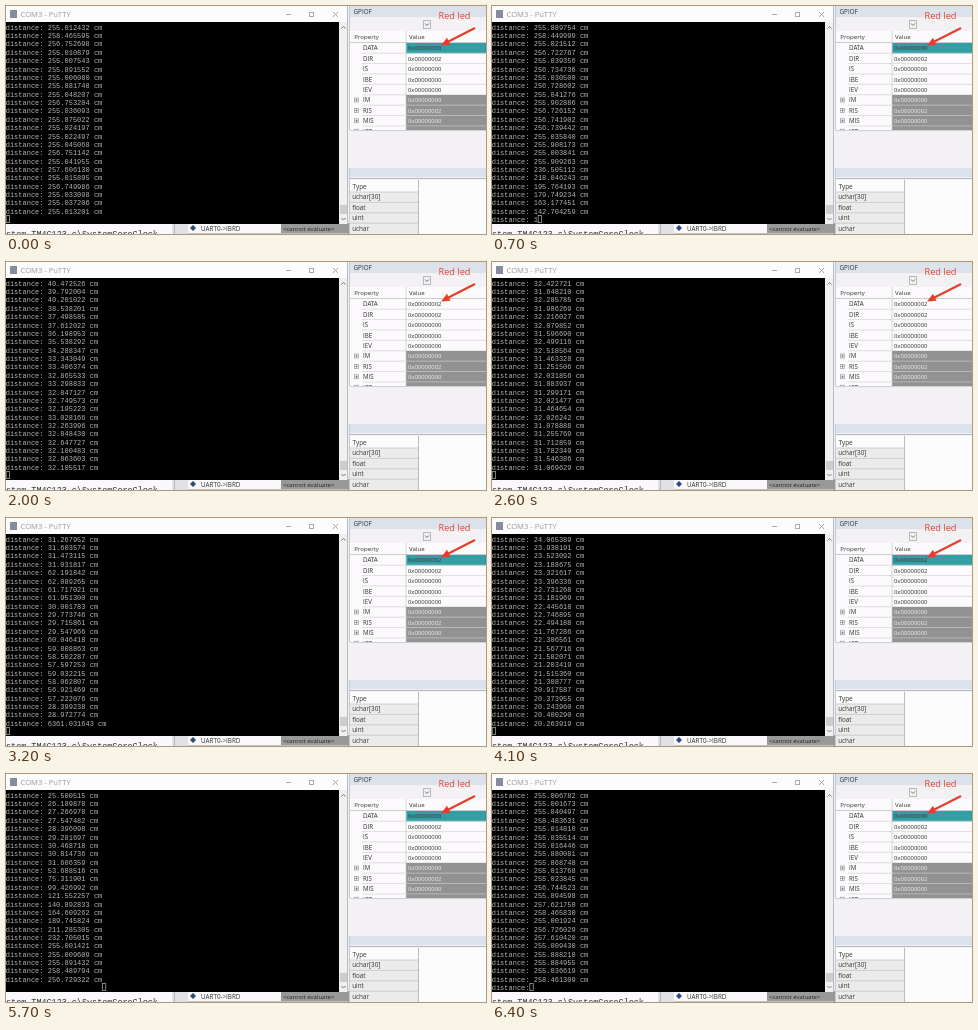
These frames come from a looping animation (480 by 228 pixels, 6.5 s). An HTML page with a canvas:

```html
<!DOCTYPE html>
<html lang="en">
<head>
<meta charset="utf-8">
<title>Distance readout</title>
<style>
  html, body { margin: 0; height: 100%; overflow: hidden; background: #f3f1f4; }
  canvas { display: block; width: 480px; height: 228px; }
</style>
</head>
<body>
<canvas id="stage" width="480" height="228"></canvas>
<script>
const ctx = document.getElementById('stage').getContext('2d');
const SANS = '"Open Sans", "Noto Sans", sans-serif';
const MONO = '"Liberation Mono", monospace';
const LOOP = 6500, STEP = 100;
const ROWS = 23, LINES_PER_STEP = 4, LINE_CHARS = 23;
const ROW_HEIGHT = 8.37, FIRST_ROW = 21.5, CHAR_WIDTH = 4.18;
const REGISTER_HEIGHT = 10.4;

// Key points of the measured distance: [line, cm].
const trend = [[0, 255], [44, 255], [52, 107], [54, 53], [60, 46], [82, 40], [90, 33],
  [131, 31], [149, 28.5], [150, 6361], [151, 28], [164, 24], [187, 20], [219, 18.5],
  [236, 32], [246, 255], [300, 255]];

function random(seed) {
  const x = Math.sin(seed * 127.1 + 31.7) * 43758.5453;
  return x - Math.floor(x);
}

function reading(line) {
  const next = trend.findIndex(point => point[0] > line);
  const [x0, y0] = trend[next - 1], [x1, y1] = trend[next];
  let cm = y0 + (y1 - y0) * (line - x0) / (x1 - x0);
  const noise = random(line), fine = random(line + 500);
  // Far readings jump in timer ticks; near ones wobble and sometimes echo twice.
  if (cm > 200) return cm + Math.floor(noise * noise * 5) * 0.86 + fine * 0.05;
  if (line >= 132 && line < 148 && Math.floor(line / 4) % 3 !== 1) cm *= 2;
  return cm * (0.98 + 0.04 * noise);
}

const lineText = line => `distance: ${reading(line).toFixed(6)} cm`;

function cursorColumn(step) {
  if (random(step + 900) < 0.5) return 0;
  return Math.min(LINE_CHARS, Math.floor(random(step + 1700) * 40));
}

function rect(x, y, w, h, color) {
  ctx.fillStyle = color;
  ctx.fillRect(x, y, w, h);
}

function text(str, x, y, size, color = '#333', family = SANS) {
  ctx.font = `${size}px ${family}`;
  ctx.fillStyle = color;
  ctx.fillText(str, x, y);
}

function trace(points) {
  ctx.beginPath();
  points.forEach(([x, y]) => ctx.lineTo(x, y));
}

function stroke(points, color, width = 1) {
  ctx.strokeStyle = color;
  ctx.lineWidth = width;
  trace(points);
  ctx.stroke();
}

function fill(points, color) {
  ctx.fillStyle = color;
  trace(points);
  ctx.fill();
}

function box(x, y, w, h, color, width = 1) {
  ctx.strokeStyle = color;
  ctx.lineWidth = width;
  ctx.strokeRect(x, y, w, h);
}

function drawBackWindow() {
  rect(0, 217, 342, 11, '#faf8fa');
  text('stem_TM4C123.c\\SystemCoreClock', 0, 230.5, 8.45, '#333', MONO);
  rect(166, 217, 16, 11, '#e2e2e6');
  rect(168, 217, 1, 11, '#b4b6ba');
  rect(275, 217, 68, 11, '#999');
  stroke([[182, 227.5], [342, 227.5]], '#c4c4c4');
  fill([[187, 219], [190, 222], [187, 225], [184, 222]], '#254a78');
  text('UART0->IBRD', 195, 224.5, 6.3);
  text('<cannot evaluate>', 277, 225, 6, '#222');
}

function drawTerminal(step) {
  rect(0, 0, 342, 218, '#fdfcfd');
  rect(4, 4, 7, 8, '#858b9b');
  text('COM3 - PuTTY', 14.5, 11, 7.6, '#999');
  stroke([[280, 8.5], [285, 8.5]], '#aaa');
  box(303.5, 6.5, 4, 4, '#aaa');
  stroke([[327, 6], [332, 11]], '#aaa');
  stroke([[332, 6], [327, 11]], '#aaa');

  rect(0, 16, 333, 202, '#000');
  rect(333, 16, 8, 202, '#f0f0f0');
  rect(334, 199, 7, 9, '#cdcdcd');
  stroke([[335.5, 22.5], [337.5, 20.5], [339.5, 22.5]], '#777');
  stroke([[335.5, 212], [337.5, 214], [339.5, 212]], '#777');
  rect(341, 0, 1, 218, '#b4bac4');

  const first = step * LINES_PER_STEP;
  const write = (str, row) => text(str, -0.3, FIRST_ROW + row * ROW_HEIGHT + 2.2, 7, '#b4b4b4', MONO);
  for (let row = 0; row < ROWS; row++) write(lineText(first + row), row);
  const column = cursorColumn(step);
  if (column < LINE_CHARS) write(lineText(first + ROWS).slice(0, column), ROWS);
  box(column * CHAR_WIDTH + 0.2, 209.5, 3.4, 7, '#9aa29a', 0.8);
}

function drawRegister(name, value, y, fillColor, readOnly) {
  if (fillColor) rect(400, y, 80, REGISTER_HEIGHT, fillColor);
  if (readOnly) {
    box(348.5, y + 3, 4, 4, '#999', 0.7);
    stroke([[349.3, y + 5], [351.7, y + 5]], '#666', 0.7);
    stroke([[350.5, y + 3.8], [350.5, y + 6.2]], '#666', 0.7);
  }
  stroke([[356, y + 10.2], [480, y + 10.2]], '#d4d2d6', 0.7);
  text(name, 357, y + 7.4, 6.2);
  text('0x' + String(value).padStart(8, '0'), 402, y + 7.4, 5.9, readOnly ? '#eee' : '#333');
}

function drawRegisters(time) {
  rect(342, 0, 138, 228, '#f3f1f4');
  rect(344, 0, 136, 11, '#dbe2ec');
  text('GPIOF', 347.5, 7.5, 6.3);
  box(417.5, 14.5, 7, 8, '#b8b8b8');
  stroke([[419, 17.5], [421, 19.5], [423, 17.5]], '#666', 0.9);
  rect(344, 25, 136, 99, '#fcfafc');
  text('Property', 348.3, 33, 6.1);
  text('Value', 403, 33, 6.1);
  stroke([[344, 36.5], [480, 36.5]], '#ccc');

  const ledOn = time >= 900 && time < 4300;
  const changed = time < 1700 || time >= 2700;
  const registers = [['DATA', ledOn ? 2 : 0], ['DIR', 2], ['IS', 0], ['IBE', 0], ['IEV', 0],
    ['IM', 0], ['RIS', 2], ['MIS', 0], ['ICR', 0]];
  ctx.save();
  ctx.beginPath();
  ctx.rect(344, 25, 136, 99);
  ctx.clip();
  registers.forEach(([name, value], i) => {
    const readOnly = i > 4;
    const color = readOnly ? '#929292' : i === 0 && changed ? '#329fa5' : null;
    drawRegister(name, value, 37 + i * REGISTER_HEIGHT, color, readOnly);
  });
  stroke([[400, 25], [400, 124]], '#ccc', 0.8);
  ctx.restore();
  stroke([[344, 124.5], [480, 124.5]], '#d0d0d4');
  stroke([[343.5, 0], [343.5, 124]], '#c4cad4');
}

function drawTypes() {
  rect(344, 162, 136, 9, '#dbe2ec');
  stroke([[344, 172.5], [480, 172.5]], '#b4bac4');
  rect(344, 174, 136, 54, '#fdfcfd');
  text('Type', 346.5, 183, 6.4);
  ['uchar[30]', 'float', 'uint', 'uchar'].forEach((name, i) => {
    const y = 186 + i * REGISTER_HEIGHT;
    rect(344, y, 68, REGISTER_HEIGHT, '#ebebeb');
    stroke([[344, y], [412, y]], '#c4c4c4', 0.8);
    text(name, 346.2, y + 7.4, 6.3);
  });
  stroke([[412.5, 174], [412.5, 228]], '#bbb');
  stroke([[343.5, 162], [343.5, 228]], '#c4cad4');
}

function drawCallout() {
  const red = '#e3402c';
  text('Red led', 432.5, 13.3, 9.2, red);
  stroke([[469, 22], [442, 35.8]], red, 2.2);
  fill([[435, 39.5], [441, 31.8], [444.5, 38.8]], red);
}

function draw() {
  const time = performance.now() % LOOP;
  drawRegisters(time);
  drawTypes();
  drawBackWindow();
  drawTerminal(Math.floor(time / STEP));
  drawCallout();
  requestAnimationFrame(draw);
}
draw();
</script>
</body>
</html>
```
